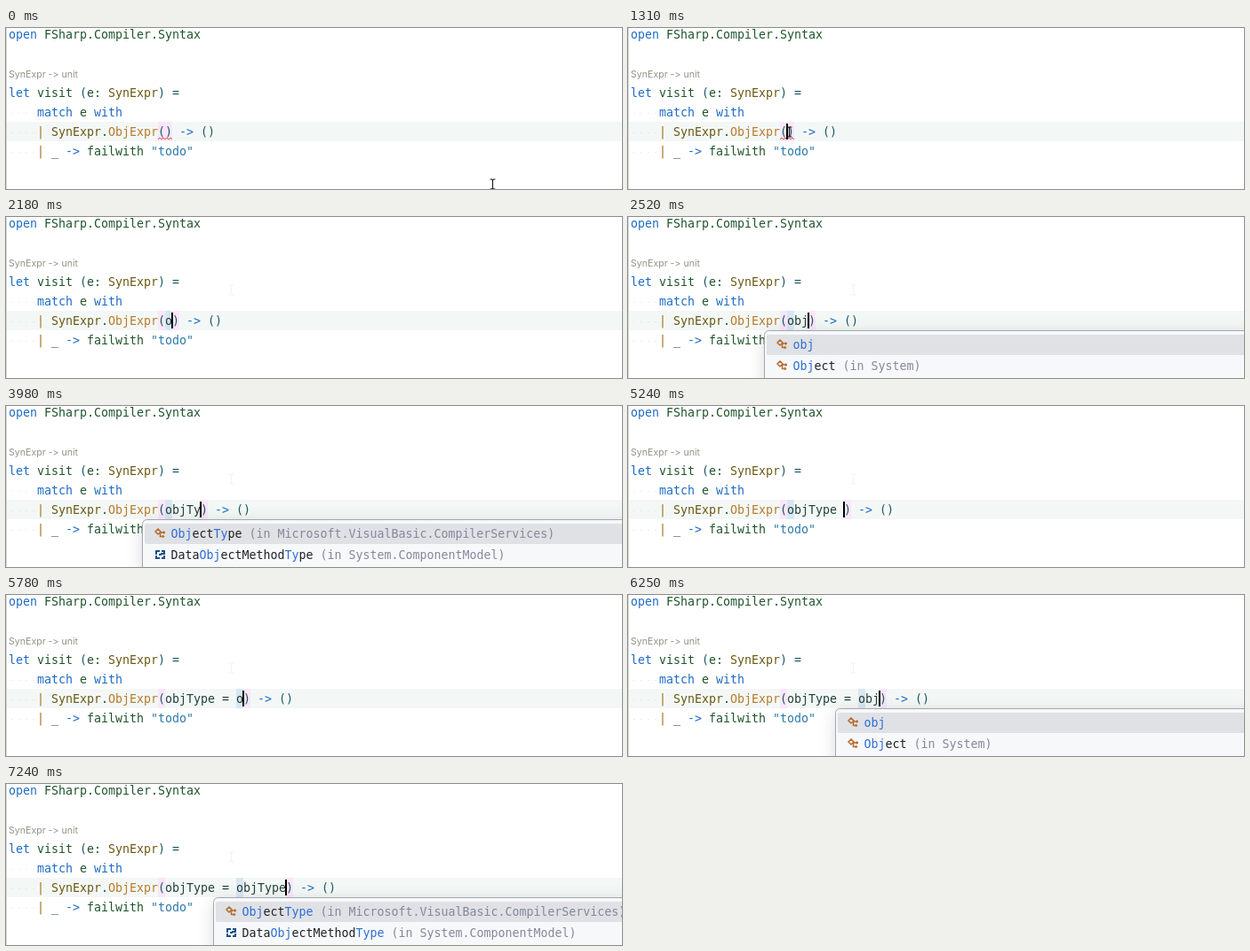
Animation of 693 by 182 pixels, one loop 8 s. Source, as an HTML page:

```html
<!DOCTYPE html>
<html lang="en">
<head>
<meta charset="utf-8">
<title>Pattern completion</title>
<style>
html, body { margin: 0; width: 100%; height: 100%; overflow: hidden; background: #fff; }
svg { display: block; width: 693px; height: 182px; }
text { white-space: pre; font: 13.29px "DejaVu Sans Mono", "Noto Sans Mono", monospace; }
.hint { font: 10.6px Inter, "Open Sans", sans-serif; font-feature-settings: "calt" 0; fill: #929287; }
.key { fill: #1f6cc4; }
.name { fill: #1f552c; }
.arg { fill: #23403a; }
.type { fill: #6b5913; }
.case { fill: #b97a2b; }
.bar { fill: #a56c10; }
.unit { fill: #1c5866; }
.str { fill: #2c7aa8; }
.ink { fill: #202226; }
.hit { fill: #2f6ed6; }
.dim { fill: #85889c; }
.pair { fill: #fbe6fa; }
.word { fill: #d8e7f3; }
.popup { filter: drop-shadow(0 4px 9px rgba(0, 0, 0, .14)); }
</style>
</head>
<body>
<svg viewBox="0 0 693 182">
  <defs>
    <g id="class" fill="none" stroke="#b66b2c" stroke-width="1.5">
      <path d="M4 1 7 4 4 7 1 4ZM6 5H9M6.5 5V9.5H8"/>
      <path d="M10.5 3.5 12 5 10.5 6.5 9 5ZM9.5 8 11 9.5 9.5 11 8 9.5Z" fill="#b66b2c" stroke-width=".8"/>
    </g>
    <g id="enum" fill="none" stroke="#1d4f86" stroke-width="2">
      <path d="M6 2H2V6M2 7V10H6M7 5H11V2H8M11 7V10H8M5 6H8"/>
    </g>
  </defs>
  <rect width="693" height="182" fill="#fff"/>
  <rect y="106" width="693" height="22" fill="#f3f8f6"/>
  <rect width="1" height="182" fill="#d5d5d5"/>
  <g id="fixed"></g>
  <g id="line"></g>
  <g id="popup"></g>
  <path id="mouse" d="M-3-5.5H-1L0-4.5 1-5.5H3M0-4.5V4.5M-3 5.5H-1L0 4.5 1 5.5H3" fill="none" stroke-width="1.2"/>
</svg>
<script>
const LOOP = 8000, CELL = 8, LEFT = 3, ARG = 179;
const $ = id => document.getElementById(id);

const esc = s => s.replace(/&/g, '&amp;').replace(/</g, '&lt;').replace(/>/g, '&gt;');
const rect = (x, y, w, h, extra) => `<rect x="${x}" y="${y}" width="${w}" height="${h}" ${extra}/>`;

// Lays out [text, class] runs on the character grid.
function runs(x, y, list) {
  let out = '';
  for (const [text, cls] of list) {
    if (text.trim()) out += `<text x="${x}" y="${y}" class="${cls}">${esc(text)}</text>`;
    x += text.length * CELL;
  }
  return out;
}

function indentDots(y) {
  let out = '';
  for (let i = 0; i < 4; i++) out += rect(LEFT + i * CELL + 3.5, y, 1, 1, 'fill="#dcdad5"');
  return out;
}

$('fixed').innerHTML =
  runs(LEFT, 12, [['open ', 'key'], ['FSharp.Compiler.Syntax', 'name']]) +
  '<text x="3" y="56" class="hint">SynExpr -&gt; unit</text>' +
  runs(LEFT, 78, [['let ', 'key'], ['visit ', 'name'], ['(', 'unit'], ['e: ', 'name'],
    ['SynExpr', 'type'], [') =', 'unit']]) +
  runs(35, 100, [['match ', 'key'], ['e ', 'name'], ['with', 'key']]) +
  runs(35, 144, [['| ', 'bar'], ['_ ', 'name'], ['-> ', 'key'], ['failwith ', 'name'], ['"todo"', 'str']]) +
  [96, 118, 140].map(indentDots).join('');

// When each text stands between the brackets.
const typing = [
  [0, ''], [2180, 'o'], [2320, 'ob'], [2520, 'obj'], [3780, 'objT'], [3980, 'objTy'],
  [4380, 'objTyp'], [4710, 'objType'], [5240, 'objType '], [5380, 'objType ='],
  [5580, 'objType = '], [5780, 'objType = o'], [6050, 'objType = ob'], [6250, 'objType = obj'],
  [6600, 'objType = objT'], [6800, 'objType = objTy'], [6980, 'objType = objTyp'],
  [7240, 'objType = objType']
];
const caretOff = [[0, 1110], [1650, 2180], [3450, 3780]];
const popups = [[2250, 5240, 0], [5850, LOOP, 10]];
const within = (t, [from, to]) => t >= from && t < to;

const shortList = [['class', 'obj', ''], ['class', 'Object', ' (in System)']];
const longList = [
  ['class', 'ObjectType', ' (in Microsoft.VisualBasic.CompilerServices)'],
  ['enum', 'DataObjectMethodType', ' (in System.ComponentModel)']
];

// Splits a suggestion into matched and unmatched runs.
function matched(label, query) {
  const a = label.search(/obj/i), b = label.indexOf('Type');
  const head = Math.min(3, query.length), tail = query.length - head;
  return [...label].map((c, i) => {
    const hit = (i >= a && i < a + head) || (b >= 0 && i >= b && i < b + tail);
    return [c, hit ? 'hit' : 'ink'];
  });
}

function drawLine(text, caret) {
  const end = ARG + text.length * CELL;
  const word = text.length > 10 ? ARG + 10 * CELL : ARG;
  let out = rect(ARG - CELL, 106, CELL, 22, 'class="pair"') + rect(end, 106, CELL, 22, 'class="pair"');
  if (text) out += rect(word, 106, CELL, 22, 'class="word"');
  else out += '<path d="M171 126l2-2 2 2 2-2 2 2 2-2 2 2 2-2 2 2" fill="none" stroke="#d9534f"/>';
  out += runs(35, 122, [['| ', 'bar'], ['SynExpr', 'type'], ['.', 'name'], ['ObjExpr', 'case'],
    ['(', 'unit'], [text, 'arg'], [') ', 'unit'], ['-> ', 'key'], ['()', 'unit']]);
  if (caret) out += rect(end - 1, 108, 2, 18, 'fill="#000"');
  return out;
}

function drawPopup(column, query) {
  const x = ARG + column * CELL - 26;
  let out = `<g class="popup">${rect(x + .5, 128.5, 720, 80, 'rx="5" fill="#f7f8fa" stroke="#a3a7b0"')}</g>` +
    rect(x + 3, 133, 720, 23, 'rx="2" fill="#dfe1e5"');
  (query.length > 3 ? longList : shortList).forEach(([icon, label, place], row) => {
    const y = 149 + row * 24;
    out += `<use href="#${icon}" x="${x + 14}" y="${y - 11}"/>`;
    out += runs(x + 32.5, y, [...matched(label, query), [place, 'dim']]);
  });
  return out;
}

// Pointer legs: start, end, from, to.
const legs = [
  [70, 750, [547, 176], [168, 105]],
  [880, 1090, [168, 105], [174, 122]],
  [1090, 1310, [174, 122], [181, 117]],
  [1310, 1580, [181, 117], [253, 82]]
];
const ease = u => u * u * (3 - 2 * u);

function pointer(t) {
  let spot = legs[0][2];
  for (const [start, end, from, to] of legs) {
    if (t < start) break;
    const stepped = start + Math.floor((t - start) / 68) * 68;
    const u = t >= end ? 1 : ease(Math.min(1, (stepped - start) / (end - start)));
    spot = from.map((v, i) => Math.round(v + (to[i] - v) * u));
  }
  return spot;
}

let shown = '';
function render(t) {
  const text = typing.filter(([at]) => at <= t).pop()[1];
  const caret = !caretOff.some(span => within(t, span));
  const popup = popups.find(span => within(t, span));
  const key = [text, caret, popup].join('|');
  if (key !== shown) {
    shown = key;
    $('line').innerHTML = drawLine(text, caret);
    $('popup').innerHTML = popup ? drawPopup(popup[2], text.slice(popup[2])) : '';
  }
  const [x, y] = pointer(t);
  $('mouse').setAttribute('transform', `translate(${x + .5} ${y + .5})`);
  $('mouse').setAttribute('stroke', t < 2180 ? '#222' : '#f3f3f3');
}

const begin = performance.now();
function tick() {
  render((performance.now() - begin) % LOOP);
  requestAnimationFrame(tick);
}
tick();
</script>
</body>
</html>
```
